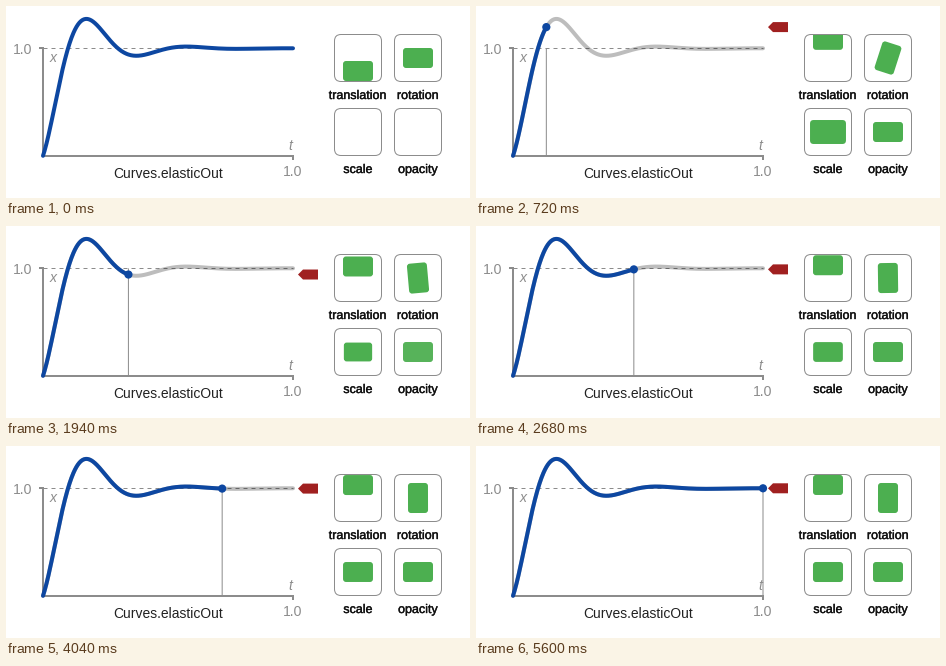
A matplotlib script for the animation above (5.62 s loop, 464 by 192 pixels).

```python
import numpy as np
import matplotlib.pyplot as plt
from matplotlib.animation import FuncAnimation
from matplotlib.patches import Circle, FancyBboxPatch, Polygon, Rectangle
from matplotlib.patheffects import withStroke
from matplotlib.transforms import Affine2D

W, H, DPI = 464, 192, 64
PX = 72 / DPI  # one pixel in points
LEFT, RIGHT, TOP, BOTTOM = 37, 287, 42.4, 149.8
UNIT = 5
STEPS = 120
BLUE, GREEN, RED = "#0d47a1", "#4caf50", "#a02020"
GREY, INK = "#8c8c8c", "#212121"

plt.rcParams["font.family"] = "Liberation Sans"


def elastic_out(t, period=0.4):
    return 1 + 2 ** (-10 * t) * np.sin((t - period / 4) * 2 * np.pi / period)


def to_stage(t):
    return LEFT + t * (RIGHT - LEFT), BOTTOM - elastic_out(t) * (BOTTOM - TOP)


fig = plt.figure(figsize=(W / DPI, H / DPI), dpi=DPI, facecolor="white")
ax = fig.add_axes([0, 0, 1, 1])
ax.set_xlim(0, W)
ax.set_ylim(H, 0)
ax.axis("off")


def line(xs, ys, color, width, z, **kw):
    return ax.plot(xs, ys, color=color, lw=width * PX, zorder=z, **kw)[0]


def label(x, y, text, size, color, **kw):
    return ax.text(x, y, text, fontsize=size * PX, color=color,
                   ha="center", va="baseline", **kw)


def round_rect(x, y, w, h, r, **kw):
    style = f"round,pad=0,rounding_size={r}"
    return ax.add_patch(FancyBboxPatch((x, y), w, h, boxstyle=style, **kw))


# Graph
line([LEFT - UNIT + 1, LEFT, LEFT, RIGHT, RIGHT],
     [TOP, TOP, BOTTOM, BOTTOM, BOTTOM + UNIT - 1], GREY, 2, 1,
     solid_capstyle="butt", solid_joinstyle="miter")
for x in np.arange(LEFT, RIGHT, 8):
    line([x, min(x + 4, RIGHT)], [TOP, TOP], GREY, 1, 1, solid_capstyle="butt")

label(16.5, 47.5, "1.0", 14, GREY)
label(287, 170, "1.0", 14, GREY)
label(47, 55.5, "x", 14, GREY, style="italic")
label(284.5, 144, "t", 14, GREY, style="italic")
label(161.8, 172, "Curves.elasticOut", 13.9, INK)

ts = np.linspace(0, 1, 501)
pos_line = line([], [], GREY, 1, 2, solid_capstyle="butt", snap=False)
track = line(*to_stage(ts), "black", 4, 3, alpha=0.26, solid_capstyle="round")
trace = line([], [], BLUE, 4, 4, solid_capstyle="round")
dot = ax.add_patch(Circle((0, 0), 4.1, fc=BLUE, lw=0, zorder=5))
tag_shape = np.array([(1, 0), (2, -1), (5, -1), (5, 1), (2, 1)]) * UNIT
tag = ax.add_patch(Polygon(tag_shape, fc=RED, lw=0, zorder=3))
markers = (pos_line, track, dot, tag)


# Sample tiles
def tile(name, cx, cy):
    round_rect(cx - 23.5, cy - 23.5, 47, 47, 6.5, fc="none", ec=GREY, lw=PX, zorder=2)
    label(cx, cy + 41, name, 12.5, "#111111",
          path_effects=[withStroke(linewidth=0.4 * PX, foreground="#111111")])
    chip = round_rect(-15, -10, 30, 20, 3, fc=GREEN, lw=0, zorder=3)
    clip = Rectangle((cx - 23, cy - 23), 46, 46, transform=ax.transData)
    chip.set_clip_path(clip)
    return chip


def place(chip, cx, cy, angle=0, scale=1):
    move = Affine2D().scale(scale).rotate_deg(angle).translate(cx, cy)
    chip.set_transform(move + ax.transData)


slider = tile("translation", 352, 52)
spinner = tile("rotation", 412, 52)
grower = tile("scale", 352, 126)
fader = tile("opacity", 412, 126)
place(fader, 412, 126)


def step_at(tick):
    # Every third step holds for five ticks, the others for one.
    cycle, r = divmod(tick, 7)
    return 3 * cycle + (0 if r == 0 else 1 if r < 6 else 2)


def draw(tick):
    t = step_at(tick) / STEPS
    v = elastic_out(t) if t else 0.0
    x, y = to_stage(t)

    for m in markers:
        m.set_visible(t > 0)
    pos_line.set_data([x, x], [BOTTOM, TOP])
    dot.center = x, y
    tag.set_xy(tag_shape + (RIGHT, y))
    trace.set_data(*to_stage(np.append(ts[ts < t], t) if t else ts))

    place(slider, 352, 65 - 26 * v)
    place(spinner, 412, 52, angle=90 * v)
    grower.set_visible(v > 0)
    place(grower, 352, 126, scale=max(v, 0.001))
    fader.set_alpha(float(np.clip(v, 0, 1)))
    return []


anim = FuncAnimation(fig, draw, frames=281, interval=20, repeat=True,
                     repeat_delay=0, cache_frame_data=False)
plt.show()
```
